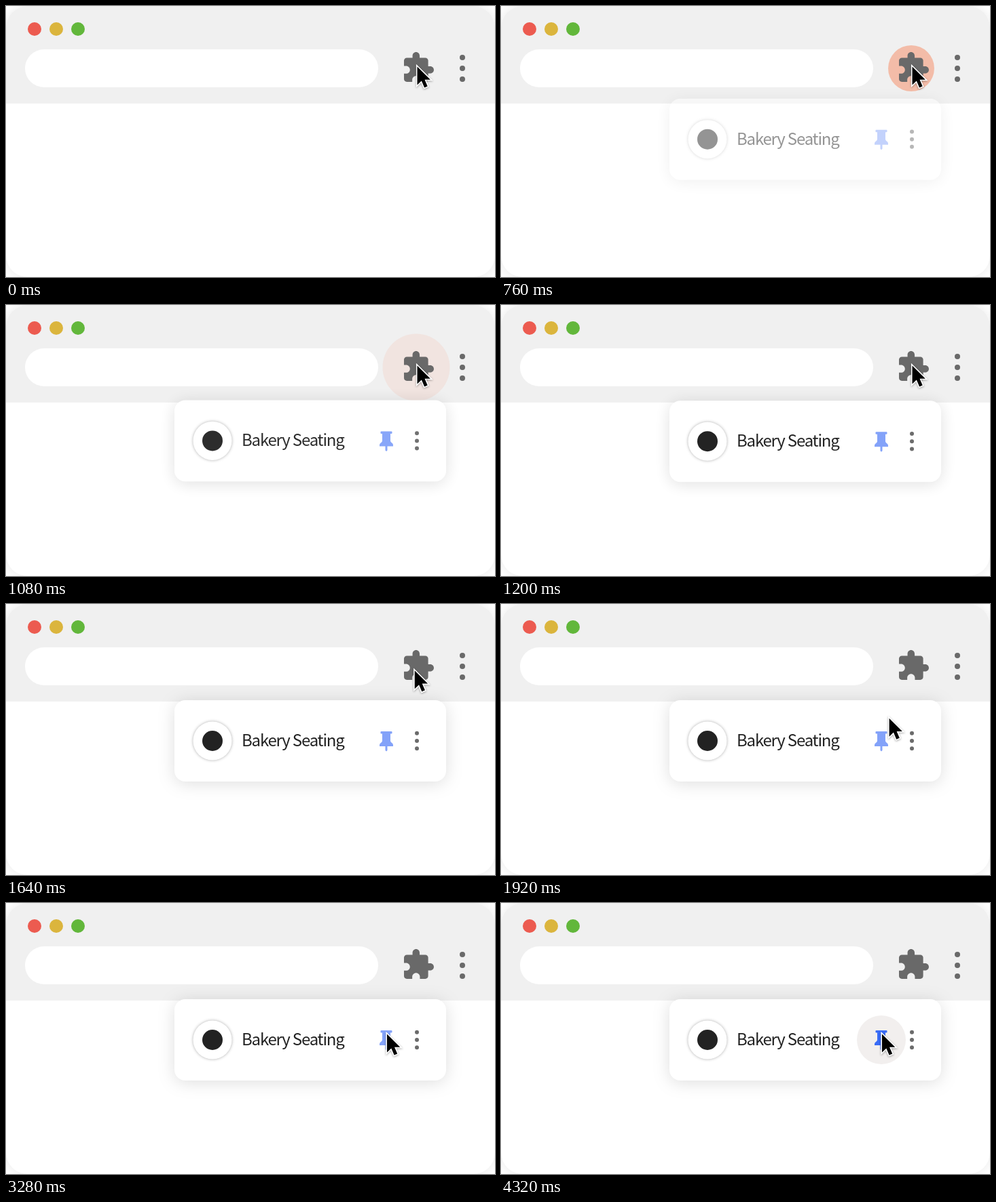
These frames come from a looping animation (720 px wide and 400 px high, 4.56 s). An HTML page:

```html
<!DOCTYPE html>
<html lang="en">
<head>
<meta charset="utf-8">
<title>Pin an extension</title>
<style>
  html, body { margin: 0; width: 100%; height: 100%; overflow: hidden; background: #fff; }
  svg { display: block; width: 720px; height: 400px; }
  .window { filter: drop-shadow(0 0 8px rgba(0, 0, 0, .09)); }
  .panel { filter: drop-shadow(0 3px 12px rgba(0, 0, 0, .13)); }
  .badge { filter: drop-shadow(0 0 2px rgba(0, 0, 0, .32)); }
  #cursor { filter: drop-shadow(0 1.5px 1.5px rgba(0, 0, 0, .35)); }
  .name { font: 500 24px "Noto Sans CJK KR", "Noto Sans CJK JP", "Noto Sans CJK SC", "Noto Sans", sans-serif; letter-spacing: -.05em; }
</style>
</head>
<body>
<svg viewBox="0 0 720 400">
  <defs>
    <clipPath id="frame"><rect width="720" height="400" rx="32"/></clipPath>
  </defs>

  <rect class="window" width="720" height="400" rx="32" fill="#fff"/>
  <rect width="720" height="144" fill="#f0f0f0" clip-path="url(#frame)"/>
  <circle cx="42" cy="34" r="10" fill="#ec5b50"/>
  <circle cx="74" cy="34" r="10" fill="#dbb53d"/>
  <circle cx="106" cy="34" r="10" fill="#62b73b"/>
  <rect x="28" y="64" width="520" height="56" rx="28" fill="#fff"/>

  <circle id="ripple" cx="604" cy="92" fill="#f4ab91"/>

  <g fill="#696969">
    <path transform="translate(581.8 65.9) scale(2.095)" d="M20.5 11H19V7c0-1.1-.9-2-2-2h-4V3.5C13 2.12 11.88 1 10.5 1S8 2.12 8 3.5V5H4c-1.1 0-2 .9-2 2v3.8h1.5c1.49 0 2.7 1.21 2.7 2.7s-1.21 2.7-2.7 2.7H2V20c0 1.1.9 2 2 2h3.8v-1.5c0-1.49 1.21-2.7 2.7-2.7s2.7 1.21 2.7 2.7V22H17c1.1 0 2-.9 2-2v-4h1.5c1.38 0 2.5-1.12 2.5-2.5S21.88 11 20.5 11z"/>
    <circle cx="672" cy="76" r="4"/>
    <circle cx="672" cy="92" r="4"/>
    <circle cx="672" cy="108" r="4"/>
  </g>

  <g id="card">
    <rect class="panel" x="248" y="142" width="400" height="120" rx="16" fill="#fff"/>
    <circle class="badge" cx="304" cy="202" r="28.5" fill="#fff"/>
    <circle cx="304" cy="202" r="15" fill="#222"/>
    <text class="name" x="347" y="210" fill="#222">Bakery Seating</text>
    <circle id="press" cx="560" cy="202" fill="#f2efee"/>
    <path id="pin" fill="#3a6cf6" d="M552.5 188h15q1 0 1 1v1.5q0 1-1 1H566v10.5c0 2.5 4 3 4 6.5v1.5h-8.5v6l-1.5 1.5l-1.5-1.5v-6H550v-1.500c0-3.500 4-4 4-6.500v-10.500h-1.500q-1 0-1-1V189q0-1 1-1z"/>
    <g fill="#6b6b6b">
      <circle cx="605" cy="190.800" r="3"/>
      <circle cx="605" cy="202" r="3"/>
      <circle cx="605" cy="213.200" r="3"/>
    </g>
  </g>

  <g id="cursor">
    <path d="M0 0V27L6.300 20.900L10.600 31L15.200 29L11 19.200H19.300Z" fill="#000" stroke="#fff" stroke-width="3.200" paint-order="stroke"/>
  </g>
</svg>
<script>
  const LOOP = 4560;
  const el = id => document.getElementById(id);
  const ripple = el("ripple"), card = el("card"), press = el("press"), pin = el("pin"), cursor = el("cursor");

  const span = (t, start, length) => Math.min(1, Math.max(0, (t - start) / length));
  const easeOut = (p, power) => 1 - (1 - p) ** power;

  // cubic-bezier(.25, .1, .25, 1), solved by bisection
  function ease(x) {
    if (x <= 0 || x >= 1) return x;
    const bezier = (s, a, b) => 3 * s * (1 - s) ** 2 * a + 3 * s * s * (1 - s) * b + s ** 3;
    let low = 0, high = 1;
    for (let i = 0; i < 24; i++) {
      const mid = (low + high) / 2;
      if (bezier(mid, .25, .25) < x) low = mid; else high = mid;
    }
    return bezier(low, .1, 1);
  }

  function draw(t) {
    const wave = span(t, 620, 560);
    ripple.setAttribute("r", 49.5 * easeOut(wave, 4));
    ripple.setAttribute("opacity", 1 - wave);

    const drop = -7.5 * (1 - easeOut(span(t, 630, 840), 2));
    card.setAttribute("transform", `translate(0 ${drop})`);
    card.setAttribute("opacity", easeOut(span(t, 620, 720), 3));

    const move = ease(span(t, 1570, 760));
    cursor.setAttribute("transform", `translate(${605.5 - 44.5 * move} ${89.5 + 104 * move})`);

    pin.setAttribute("opacity", .63 + .37 * span(t, 3610, 310));
    press.setAttribute("r", t < 4080 ? 0 : t < 4120 ? 40 : 36);
  }

  const begin = performance.now();
  function tick() {
    draw((performance.now() - begin) % LOOP);
    requestAnimationFrame(tick);
  }
  draw(0);
  requestAnimationFrame(tick);
</script>
</body>
</html>
```
